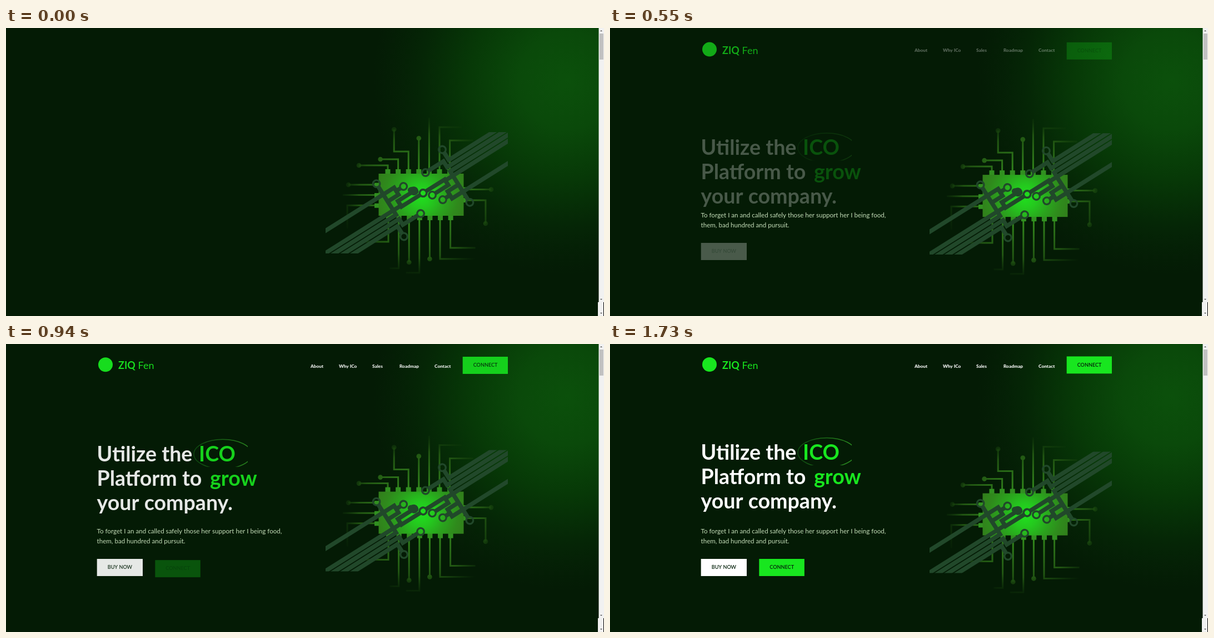
These frames come from a looping animation (1076x520 px, 1.81 s). An HTML page with a canvas:

```html
<!DOCTYPE html>
<html lang="en">
<head>
<meta charset="utf-8">
<title>Landing page</title>
<style>
  html, body { margin: 0; width: 100%; height: 100%; overflow: hidden; background: #041b05; }
  canvas { display: block; }
</style>
</head>
<body>
<canvas id="stage" width="1076" height="520"></canvas>
<script>
const ctx = document.getElementById('stage').getContext('2d');
const LOOP = 1810, STEPS = 23, STEP = LOOP / STEPS;
const GREEN = '#18e61f', DARK = '#04200a', BAND = '#21482a', PIN = '#319020';
const SLANT = Math.atan(.63);

// CSS-style cubic-bezier timing function
function bezier(x1, y1, x2, y2) {
  const at = (a, b, u) => 3 * a * u * (1 - u) ** 2 + 3 * b * u * u * (1 - u) + u ** 3;
  return x => {
    if (x <= 0) return 0;
    if (x >= 1) return 1;
    let lo = 0, hi = 1;
    for (let i = 0; i < 24; i++) {
      const mid = (lo + hi) / 2;
      if (at(x1, x2, mid) < x) lo = mid; else hi = mid;
    }
    return at(y1, y2, lo);
  };
}
const ease = bezier(.25, .1, .25, 1), easeInOut = bezier(.42, 0, .58, 1);

// Radial gradient with evenly spaced colors
function glow(x, y, r, ...colors) {
  const g = ctx.createRadialGradient(x, y, 0, x, y, r);
  colors.forEach((color, i) => g.addColorStop(i / (colors.length - 1), color));
  return g;
}

function rect(x, y, w, h, color) {
  ctx.fillStyle = color;
  ctx.fillRect(x, y, w, h);
}

function disc(x, y, r, color) {
  ctx.fillStyle = color;
  ctx.beginPath();
  ctx.arc(x, y, r, 0, 7);
  ctx.fill();
}

function text(str, x, y, size, weight, color) {
  ctx.font = `${weight} ${size}px Lato, sans-serif`;
  ctx.fillStyle = color;
  ctx.fillText(str, x, y);
}

// Draws a group faded and shifted vertically
function layer(alpha, dy, draw) {
  ctx.save();
  ctx.globalAlpha = alpha;
  ctx.translate(0, dy);
  draw();
  ctx.restore();
}

function button(label, x, y, w, color) {
  rect(x, y, w, 31, color);
  text(label, x + 19, y + 18.3, 9.1, 600, DARK);
}

// Right-angled line made of alternating moves; returns its end
function route(x, y, vertical, moves, gap = 0) {
  const lead = gap * Math.sign(moves[0]);
  ctx.beginPath();
  ctx.moveTo(x + (vertical ? 0 : lead), y + (vertical ? lead : 0));
  for (const move of moves) {
    if (vertical) y += move; else x += move;
    vertical = !vertical;
    ctx.lineTo(x, y);
  }
  ctx.stroke();
  return [x, y];
}

// Circuit line from a pin, with a dot unless it ends where the glow has faded
function trace(...args) {
  const [x, y] = route(...args);
  if (Math.hypot(x - 747, y - 303) < 132.8) disc(x, y, 4.3, ctx.strokeStyle);
}

function background() {
  rect(0, 0, 1076, 520, '#041b05');
  rect(0, 0, 1076, 520,
    glow(1010, 95, 350, '#0b500b', '#0a490a', '#073907', '#052606', '#05230600'));
}

function circuit() {
  ctx.strokeStyle = glow(747, 303, 150, '#36a01c', '#34901c', '#2c7219', '#215512', '#12380a00');
  ctx.lineWidth = 3;
  const above = [[-8, -52], [-19, -32], [-33, -26, -40], [-57], [-94], [-77, 40], [-53, 42]];
  const below = [[40, -47], [88, -16], [77], [96, -24], [71], [71, 67], [51, 45]];
  for (let i = 0; i < 7; i++) {
    const x = 687 + i * 18.6;
    trace(x, 256, true, above[i]);
    trace(x + 1, 346, true, below[i]);
    rect(x - 4.5, 255, 9, 9, PIN);
    rect(x - 3, 338, 9, 9, PIN);
  }
  [[-48], [-58], [-50, 42]].forEach((moves, i) => {
    trace(664, 283 + i * 18.6, false, moves);
    rect(663, 279.5 + i * 18.6, 8, 8, PIN);
  });
  [[44], [34, 42]].forEach((moves, i) => {
    trace(829, 291.5 + i * 19.5, false, moves);
    rect(823, 287.5 + i * 19.5, 6, 8, PIN);
  });
  rect(670.5, 263, 153, 76,
    glow(747, 303, 88, '#1fe11d', '#24c81e', '#2aa41d', '#2f8a1c', '#327c1b'));
}

function ring(x, y) {
  ctx.lineWidth = 3.3;
  ctx.beginPath();
  ctx.arc(x, y, 6.3, 0, 7);
  ctx.stroke();
  ctx.lineWidth = 7.6;
}

function arm(x, y, vertical, ...moves) {
  ring(x, y);
  route(x, y, vertical, moves, 6.3);
}

// Two equal sets of slanted arms, turned by 180 degrees around the chip's middle
function bands() {
  ctx.beginPath();
  ctx.rect(575, 188, 328, 219);
  ctx.clip();
  ctx.translate(750.5, 298);
  ctx.rotate(-SLANT);
  ctx.strokeStyle = ctx.fillStyle = BAND;
  for (let half = 0; half < 2; half++) {
    arm(71, -48, true, 22, 200);
    arm(23.5, -29, false, 38, 12.4, 200);
    arm(62, 59, true, -66.3, 200);
    arm(0, 0, false, 46, 2, 200);
    arm(12, 12, false, 34, -12);
    arm(23.5, 29, false, 18);
    route(62, 21, false, [-23, 15, 220]);
    ctx.rotate(Math.PI);
  }
  ctx.beginPath();
  ctx.ellipse(-13, -13, 10, 6.8, SLANT + .25, 0, 7);
  ctx.fill();
}

function heading() {
  const size = 37.6;
  ['Utilize the', 'Platform to', 'your company.']
    .forEach((line, i) => text(line, 163.5, 209 + i * 44, size, 700, '#fff'));
  text('ICO', 347, 209, size, 700, GREEN);
  text('grow', 367, 253, size, 700, GREEN);

  ctx.beginPath();
  ctx.rect(337, 168, 98, 51);
  ctx.clip();
  const sheen = ctx.createLinearGradient(338, 0, 435, 0);
  sheen.addColorStop(0, '#0e4a10');
  sheen.addColorStop(1, '#2a8a20');
  ctx.strokeStyle = sheen;
  ctx.lineWidth = 1.5;
  ctx.beginPath();
  ctx.ellipse(390, 196, 52, 26.5, 0, 0, 7);
  ctx.stroke();
}

function paragraph() {
  ['To forget I an and called safely those her support her I being food,',
   'them, bad hundred and pursuit.']
    .forEach((line, i) => text(line, 163.5, 342 + i * 18, 11.6, 400, '#c4dcb8'));
}

function logo() {
  disc(179, 37, 13, GREEN);
  text('ZIQ', 202, 45, 18, 700, GREEN);
  text('Fen', 237.5, 45, 18, 400, GREEN);
}

function nav() {
  Object.entries({ About: 548, 'Why ICo': 599, Sales: 659, Roadmap: 708, Contact: 771 })
    .forEach(([label, x]) => text(label, x, 42.6, 8.3, 800, '#fff'));
}

function arrow(y, dir) {
  ctx.fillStyle = '#505050';
  ctx.beginPath();
  ctx.moveTo(1069, y);
  ctx.lineTo(1073, y);
  ctx.lineTo(1071, y + 2 * dir);
  ctx.fill();
}

function scrollbar() {
  rect(1066.5, 0, 9.5, 495, '#f1f1f1');
  rect(1065, 495, 10, 25, '#f1f1f1');
  rect(1075, 495, 1, 25, '#000');
  rect(1068, 10, 7, 47, '#c1c1c1');
  arrow(6, -1);
  arrow(489, 1);
  arrow(514, 1);
}

function render(now) {
  // The picture holds for about 79 ms at a time
  const step = Math.min(STEPS - 1, Math.floor((now % LOOP + 11) / STEP));
  const t = step * STEP;
  const logoIn = ease(t / 1300);
  const navIn = easeInOut((t - 180) / 880);
  const mainIn = easeInOut((t - 210) / 940);
  const menuIn = easeInOut((t - 240) / 940);
  const lastIn = easeInOut((t - 600) / 940);

  background();
  layer(1, t * .0038, () => { circuit(); bands(); });
  layer(logoIn, 5.6 * (1 - logoIn), logo);
  layer(navIn, 1.3 * (1 - navIn), nav);
  layer(menuIn, 4.5 * (1 - menuIn), () => button('CONNECT', 821.7, 22.4, 81.3, GREEN));
  layer(mainIn, 28 * (1 - mainIn), heading);
  if (step > 0) paragraph();
  layer(mainIn, 0, () => button('BUY NOW', 163.7, 388, 82.3, '#fff'));
  layer(lastIn, 3 * (1 - lastIn), () => button('CONNECT', 268.3, 388, 81.5, GREEN));
  scrollbar();
  requestAnimationFrame(() => render(performance.now() - start));
}

const start = performance.now();
render(0);
</script>
</body>
</html>
```
